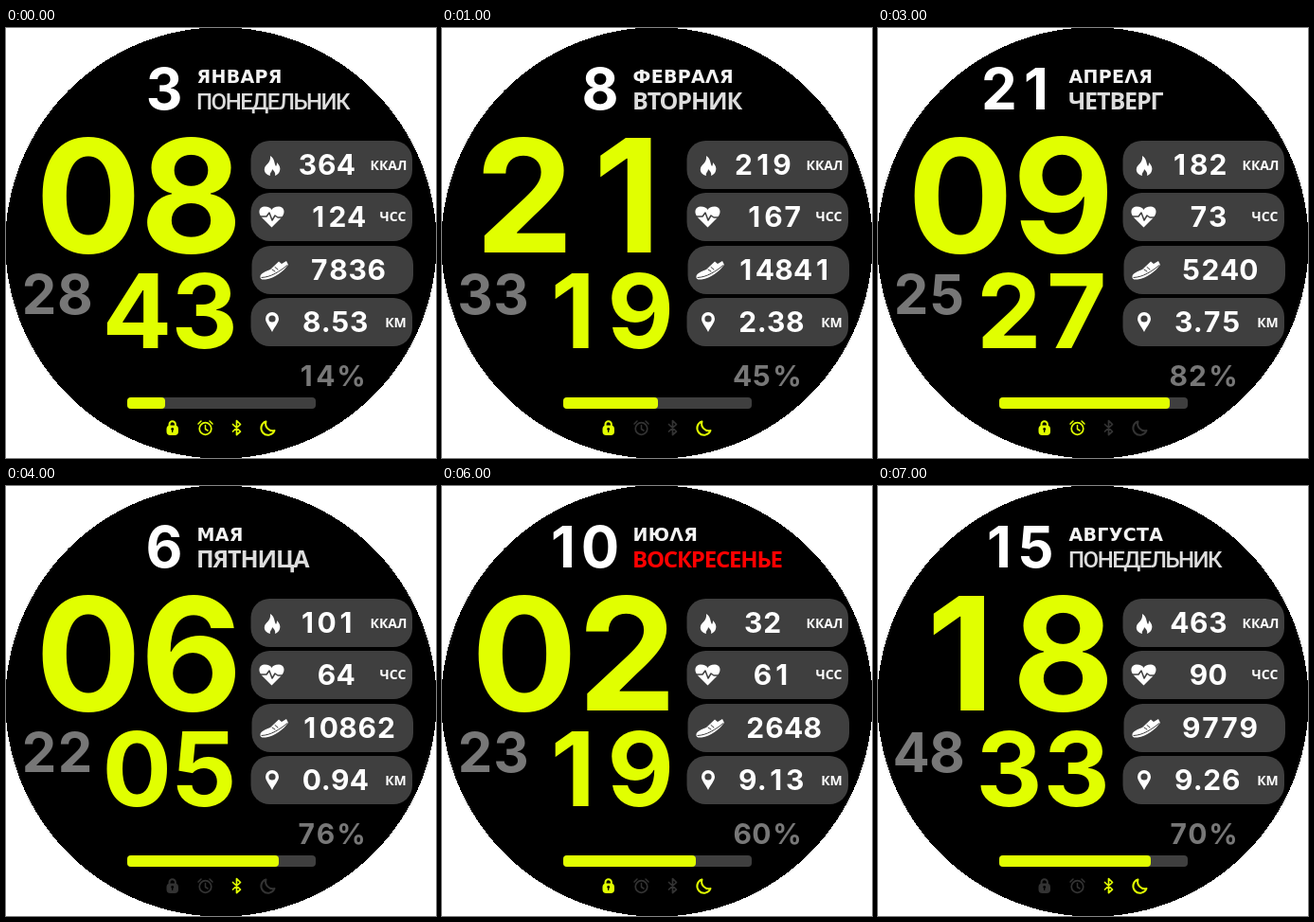
Write an HTML page that moves like this. It is 454 px wide and 454 px high and loops after 8 s.

```html
<!DOCTYPE html>
<html lang="ru">
<head>
<meta charset="utf-8">
<title>Watch face</title>
<style>
  html, body { margin: 0; width: 100%; height: 100%; overflow: hidden; background: #fff; }
  svg { display: block; width: 454px; height: 454px; }
  .num { font-family: Inter, sans-serif; font-weight: 700; text-anchor: middle; }
  .unit { font: 700 14px "Open Sans", sans-serif; text-anchor: middle; fill: #fff; }
  .month { font: 700 19px "DejaVu Sans", sans-serif; letter-spacing: .3px; fill: #f4f4f4; }
  .day { font: 700 25px "Open Sans", sans-serif; letter-spacing: -1.1px; }
  .day.long { font: 500 24px Roboto, sans-serif; letter-spacing: -1.5px; }
  .day.sunday { font-size: 24px; letter-spacing: -1.2px; }
  .line { fill: none; stroke-linecap: round; stroke-linejoin: round; }
</style>
</head>
<body>
<svg id="face" viewBox="0 0 454 454"></svg>
<script>
const LIME = '#e1ff00', PANEL = '#3f3f3f', GRAY = '#777', WHITE = '#fff', OFF = '#333', RED = '#f00';
const STEP = 1000;

// icons: L lock, A alarm, B bluetooth, M moon
const fields = ['date', 'month', 'day', 'hour', 'minute', 'second', 'kcal', 'pulse', 'steps', 'km', 'battery', 'icons'];
const states = [
  '3 ЯНВАРЯ ПОНЕДЕЛЬНИК 08 43 28 364 124 7836 8.53 14 LABM',
  '8 ФЕВРАΛЯ ВТОРНИК 21 19 33 219 167 14841 2.38 45 LM',
  '23 МАРТА СРЕДА 14 02 08 310 97 6523 14.36 60 B',
  '21 АПРЕΛЯ ЧЕТВЕРГ 09 27 25 182 73 5240 3.75 82 LA',
  '6 МАЯ ПЯТНИЦА 06 05 22 101 64 10862 0.94 76 B',
  '25 ИЮНЯ СУББОТА 17 38 46 276 118 8365 6.42 35 AM',
  '10 ИЮΛЯ ВОСКРЕСЕНЬЕ 02 19 23 32 61 2648 9.13 60 LM',
  '15 АВГУСТА ПОНЕДЕЛЬНИК 18 33 48 463 90 9779 9.26 70 BM'
].map(row => {
  const values = row.split(' ');
  return Object.fromEntries(fields.map((name, i) => [name, values[i]]));
});

const label = (cls, x, y, text, fill = '') =>
  `<text class="${cls}" x="${x}" y="${y}"${fill && ` fill="${fill}"`}>${text}</text>`;

// Digits sit in equal cells centred on cx; a point takes half a cell.
function digits(text, cx, y, size, pitch, fill) {
  const widths = [...text].map(c => c === '.' ? pitch / 2 : pitch);
  let x = cx - widths.reduce((a, b) => a + b, 0) / 2;
  return [...text].map((c, i) => {
    const mid = x + widths[i] / 2;
    x += widths[i];
    return `<text class="num" font-size="${size}" fill="${fill}" x="${mid}" y="${y}">${c}</text>`;
  }).join('');
}

const box = (x, y, w, h, r, fill) =>
  `<rect x="${x}" y="${y}" width="${w}" height="${h}" rx="${r}" fill="${fill}"/>`;
const shape = (d, fill = WHITE) => `<path d="${d}" fill="${fill}"/>`;
const line = (d, color, width) => `<path class="line" d="${d}" stroke="${color}" stroke-width="${width}"/>`;
const dot = (x, y, r, fill) => `<circle cx="${x}" cy="${y}" r="${r}" fill="${fill}"/>`;

const flame = shape('M279 135C284 138 283 143 285 146C286 145 286 143 286 142C289 145 290 148 289 151C288 154 286 155 284 156' +
  'C285 153 283 151 281 149C281 152 278 153 279 156C275 155 272 152 273 148C274 144 280 142 279 135Z');
const heart = shape('M280.5 210.5L270 200C265 194 268 188.500 273 188.500C277 188.500 279.500 190 280.500 192C281.500 190 284 188.500 288 188.500C293 188.500 296 194 291 200Z') +
  line('M267 199H275L278 195L281 203L284 198L287 200H294', PANEL, 1.5);
const shoe = shape('M268.500 262C269 259 274 257 279 255L288 246.500L291 249L296 246L298 250C293 257 284 264 274 265.500C270 266 268 265 268.500 262Z') +
  line('M270 263.500C280 263 289 257 297 250.500', PANEL, 1) +
  line('M281 255L284 257M284 252.500L287 255', PANEL, 1);
const pin = shape('M281 321C278 315 274 311 274 307A7 7 0 0 1 288 307C288 311 284 315 281 321Z') + dot(281, 307, 3.6, PANEL);

const backdrop = '<circle cx="227" cy="227" r="227.700" shape-rendering="crispEdges"/>' +
  box(258.5, 119, 170.5, 51, 20, PANEL) + box(258.5, 174, 170.5, 51, 20, PANEL) +
  box(259.5, 230, 170.5, 51, 20, PANEL) + box(258.5, 285, 170.5, 51, 20, PANEL) +
  flame + heart + shoe + pin +
  label('unit', 404, 150, 'ККАЛ') + label('unit', 408.5, 204, 'ЧСС') + label('unit', 411.5, 316, 'КМ') +
  digits('%', 364.5, 378, 30, 20, GRAY) + box(128, 390, 199, 12, 4, PANEL);

const badges = {
  L: c => line('M172.500 421V418.500A3.200 3.200 0 0 1 178.900 418.500V421', c, 2) +
    box(169.5, 419.5, 12.5, 10.5, 4, c) + dot(175.7, 423.5, 1.4, '#000') + line('M175.700 424V426.500', '#000', 1.2),
  A: c => `<circle class="line" cx="210.500" cy="423" r="6.300" stroke="${c}" stroke-width="1.700"/>` +
    line('M210.500 419.500V423.500L213 425M203 418L206 415M218 418L215 415', c, 1.5),
  B: c => line('M239.500 418.500L247.500 426L243.500 429.500V414.500L247.500 418.500L239.500 426', c, 1.7),
  M: c => line('M274.500 415.500A7.300 7.300 0 1 0 283.500 425A7.500 7.500 0 0 1 274.500 415.500Z', c, 2)
};

function dayName(name) {
  const weekend = name === 'СУББОТА' || name === 'ВОСКРЕСЕНЬЕ';
  const style = name === 'ПОНЕДЕЛЬНИК' ? ' long' : name === 'ВОСКРЕСЕНЬЕ' ? ' sunday' : '';
  return label('day' + style, 201, 85.5, name, weekend ? RED : '#ddd');
}

function render(s) {
  const charge = (Math.floor(s.battery / 10) + 1) * 20;
  return backdrop +
    digits(s.date, s.date.length > 1 ? 147.5 : 167, 86.3, 60, 39, WHITE) +
    label('month', 201.5, 57.7, s.month) + dayName(s.day) +
    digits(s.hour, 141.3, 236.5, 166, 108.5, LIME) +
    digits(s.minute, 174, 338.3, 109, 71.3, LIME) +
    digits(s.second, 54, 302, 58, 38, GRAY) +
    digits(s.kcal, 338.7, 155.3, 30, 20.2, WHITE) +
    digits(s.pulse, s.pulse.length > 2 ? 350 : 348.5, 210.3, 30, 20.2, WHITE) +
    digits(s.steps, 361, 266.3, 30, 20.2, WHITE) +
    digits(s.km, 347.8, 320.5, 30, 20, WHITE) +
    digits(s.battery, 327.3, 378, 30, 20.2, GRAY) +
    box(128, 390, charge, 12, 4, LIME) +
    Object.entries(badges).map(([key, draw]) => draw(s.icons.includes(key) ? LIME : OFF)).join('');
}

const face = document.getElementById('face');
let shown = -1;
function tick() {
  const index = Math.floor(performance.now() / STEP) % states.length;
  if (index !== shown) face.innerHTML = render(states[shown = index]);
  requestAnimationFrame(tick);
}
tick();
</script>
</body>
</html>
```
